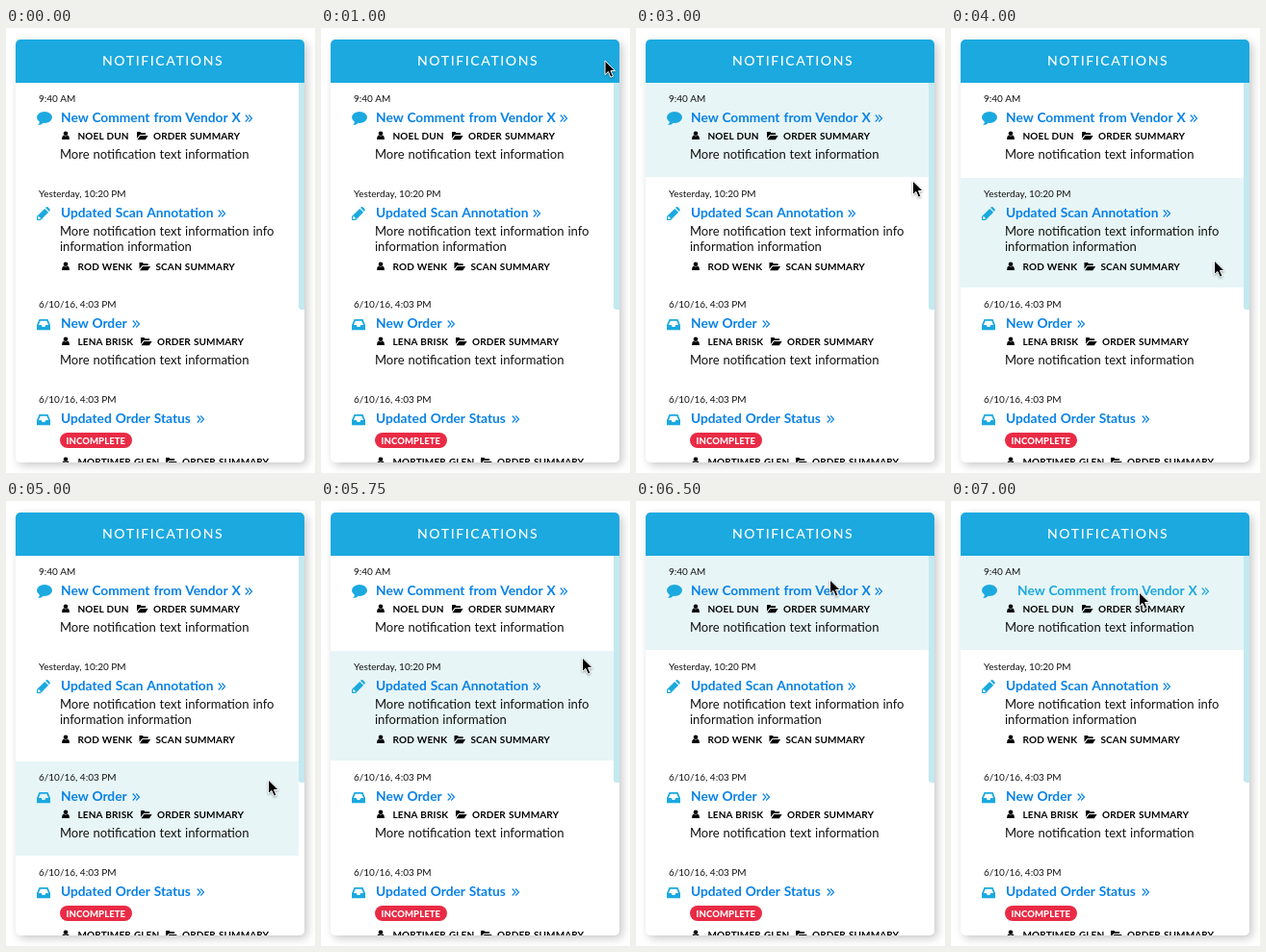
An HTML page for the animation above (8000 ms loop, 321 by 463 pixels).

```html
<!DOCTYPE html>
<html lang="en">
<head>
<meta charset="utf-8">
<title>Notifications</title>
<style>
  html, body { margin: 0; width: 100%; height: 100%; overflow: hidden; background: #fff; }
  .card {
    position: absolute; left: 10px; top: 12px; width: 300px; height: 440px;
    border-radius: 5px; background: #fff; box-shadow: 3px 3px 10px rgba(0, 0, 0, .22);
  }
  svg { position: absolute; left: 0; top: 0; font-family: Lato, "Open Sans", sans-serif; }
  .head { font-size: 14px; font-weight: 500; letter-spacing: 1.6px; fill: #fff; }
  .time { font-size: 10px; fill: #111; }
  .title { font-size: 13.75px; font-weight: 700; word-spacing: .7px; }
  .meta { font-size: 10px; font-weight: 700; letter-spacing: .12px; word-spacing: .5px; fill: #000; }
  .body { font-size: 13px; word-spacing: .6px; fill: #111; }
  .badge { font-size: 9.5px; font-weight: 800; letter-spacing: .1px; fill: #fff; }
  .icon { fill: #1ba9df; }
  #pointer { filter: drop-shadow(.5px 1px .8px rgba(0, 0, 0, .35)); }
</style>
</head>
<body>
<div class="card"></div>
<svg id="stage" width="321" height="463" viewBox="0 0 321 463"></svg>
<script>
const LOOP = 8000, STEP = 250;
const BLUE = [8, 130, 230], CYAN = [27, 169, 223];
const NOTE = 'More notification text information';

const rows = [
  { top: 57, icon: 'comment', time: '9:40 AM', title: 'New Comment from Vendor X', arrow: 248,
    name: 'NOEL DUN', link: 'ORDER SUMMARY', linkX: 153, body: [NOTE] },
  { top: 156, icon: 'pencil', time: 'Yesterday, 10:20 PM', title: 'Updated Scan Annotation', arrow: 220,
    name: 'ROD WENK', link: 'SCAN SUMMARY', linkX: 155.5, metaY: 96,
    body: [NOTE + ' info', 'information information'], bodyY: 60 },
  { top: 271, icon: 'inbox', time: '6/10/16, 4:03 PM', title: 'New Order', arrow: 131,
    name: 'LENA BRISK', link: 'ORDER SUMMARY', linkX: 157, body: [NOTE] },
  { top: 370, icon: 'inbox', time: '6/10/16, 4:03 PM', title: 'Updated Order Status', arrow: 198,
    name: 'MORTIMER GLEN', link: 'ORDER SUMMARY', linkX: 183, metaY: 85, body: [], badge: 'INCOMPLETE' }
];

// Icons are drawn from their top left corner.
const icons = {
  comment: '<ellipse cx="8" cy="6" rx="8" ry="6"/><path d="M3 10Q3 12.5 1.2 14Q5 14 7 11.5Z"/>',
  pencil: '<path d="M0 14V10L8.2 1.9 12.1 5.8 4 14ZM1.2 10.6V12.8H3.4L4 12 2 10Z"/><path d="M9 1.1Q10.5-.7 12 .8L13.2 2Q14.7 3.5 12.9 5Z"/>',
  inbox: '<path d="M2.5 0H11.5L14 6V11.2H0V6ZM3.7 1.7L1.9 6H4.7L5.7 8H8.3L9.3 6H12.1L10.3 1.7Z"/>',
  person: '<circle cx="4" cy="2.3" r="2.3"/><path d="M1.9 4.1Q4 6 6.1 4.1Q8 5 8 8.6H0Q0 5 1.9 4.1Z"/>',
  folder: '<path d="M0 6.8V0H3.6L4.3 1.2H9.1V3H3Z"/><path d="M.5 8.2L3.5 4H11.6L8.8 8.2Z"/>'
};

const text = (x, y, cls, str) => `<text x="${x}" y="${y}" class="${cls}">${str}</text>`;
const icon = (x, y, kind, cls = '') =>
  `<g class="${cls}" fill-rule="evenodd" transform="translate(${x} ${y})">${icons[kind]}</g>`;

function drawRow(r, i) {
  const y = r.top, meta = y + (r.metaY || 59), body = y + (r.bodyY || 79);
  const height = r.body.length > 1 ? 114 : 98;
  return `<rect class="shade" x="10" y="${y}" width="294" height="${height}" fill="#e7f5f7" opacity="0"/>`
    + text(34, y + 20, 'time', r.time)
    + icon(32, y + (r.icon === 'inbox' ? 32 : 30), r.icon, 'icon')
    + `<g id="title${i}" fill="rgb(${BLUE})">` + text(57, y + 41, 'title', r.title)
    + `<path transform="translate(${r.arrow} ${y + 33})" d="M.7 .5L4 4 .7 7.5M4.2 .5L7.5 4 4.2 7.5" fill="none" stroke="rgb(${BLUE})" stroke-width="1.1"/></g>`
    + icon(58, meta - 8.5, 'person') + text(74.5, meta, 'meta', r.name)
    + icon(r.linkX - 17, meta - 8, 'folder') + text(r.linkX, meta, 'meta', r.link)
    + r.body.map((line, n) => text(56, body + n * 16, 'body', line)).join('')
    + (r.badge ? `<rect x="56" y="${y + 51}" width="75" height="16" rx="8" fill="#e92b45"/>` + text(62.5, y + 62.5, 'badge', r.badge) : '');
}

const stage = document.getElementById('stage');
stage.innerHTML = `
  <clipPath id="edge"><rect x="10" y="12" width="300" height="440" rx="5"/></clipPath>
  <g clip-path="url(#edge)">
    ${rows.map(drawRow).join('')}
    <path d="M304 57H310V293H307Q304 293 304 290Z" fill="#c3e9f0"/>
    <rect x="10" y="12" width="300" height="45" fill="#1ba9df"/>
    ${text(100, 39, 'head', 'NOTIFICATIONS')}
  </g>
  <path id="pointer" d="M0 0V14.6L3.4 11.4 5.9 17.2 8.5 16.1 6 10.5H10.6Z" stroke="#fff"/>`;

// Pointer stops: time, x, y
const stops = [
  [500, 306, 35], [750, 302, 35], [1000, 295, 34], [1250, 294, 39],
  [1500, 292, 82], [1750, 291, 104], [3000, 287.5, 159], [3250, 285, 174],
  [3500, 284, 183], [4000, 273.5, 242], [4250, 271, 276], [4500, 271, 286],
  [4750, 271, 291], [5000, 272.5, 290], [5250, 273, 283], [5500, 273, 225],
  [5750, 271.5, 163], [6000, 260, 110], [6250, 237, 73], [6500, 201.5, 82],
  [6750, 197, 91], [7000, 195.5, 95]
];

// Hover spans: enter and leave times
const rowSpans = [
  [[1750, 3250], [6000, LOOP]],
  [[3250, 4250], [5500, 6000]],
  [[4500, 5500]]
];
const titleSpans = [[6750, LOOP]];

// Each hover takes two steps to fade in and two to fade out.
const ramp = (t, from) => Math.min(1, Math.max(0, (t - from + STEP) / (2 * STEP)));
const level = (t, spans) => spans.reduce((sum, [enter, leave]) =>
  sum + (t < enter ? 0 : ramp(t, enter) - (t < leave ? 0 : ramp(t, leave))), 0);

const shades = stage.querySelectorAll('.shade');
const pointer = document.getElementById('pointer');
const title = document.getElementById('title0');
const arrow = title.querySelector('path');

function draw(now) {
  const t = Math.floor(now % LOOP / STEP) * STEP;
  const [, x, y] = stops.filter(s => s[0] <= t).pop() || [0, -40, -40];
  pointer.setAttribute('transform', `translate(${x} ${y})`);
  rowSpans.forEach((spans, i) => shades[i].setAttribute('opacity', level(t, spans)));
  const hover = level(t, titleSpans);
  const color = `rgb(${BLUE.map((v, i) => Math.round(v + (CYAN[i] - v) * hover))})`;
  title.setAttribute('transform', `translate(${12 * hover} 0)`);
  title.setAttribute('fill', color);
  arrow.setAttribute('stroke', color);
}

const start = performance.now();
function tick() {
  draw(performance.now() - start);
  requestAnimationFrame(tick);
}
tick();
</script>
</body>
</html>
```
